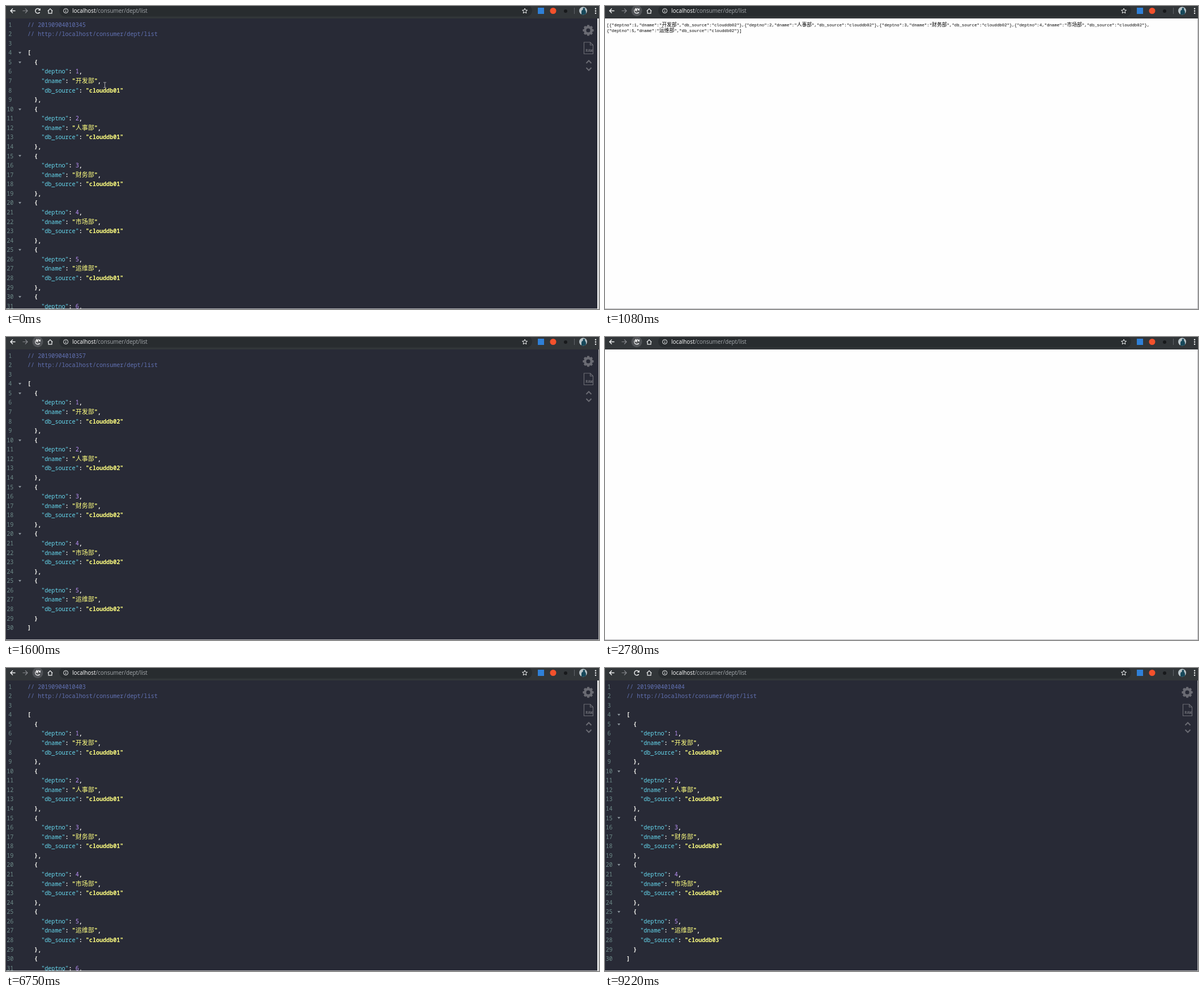
These frames come from a looping animation (1047x535 px, 9600 ms). An HTML page with a canvas:

```html
<!DOCTYPE html>
<html lang="zh">
<head>
<meta charset="utf-8">
<style>
html, body { margin: 0; width: 100%; height: 100%; overflow: hidden; background: #282a36; }
canvas { display: block; }
</style>
</head>
<body>
<canvas id="stage" width="1047" height="535"></canvas>
<script>
const ctx = document.getElementById('stage').getContext('2d');
const LOOP = 9600;
const MONO = '"Noto Sans Mono", monospace';
const CJK = '"Noto Sans CJK SC", "Noto Sans CJK", sans-serif';
const STYLES = {
  key: { color: '#66d9ef', weight: 500 },
  string: { color: '#ffff80', weight: 600 },
  number: { color: '#bd93f9', weight: 500 },
  mark: { color: '#f8f8f2', weight: 600 }
};
const DEPTS = ['开发部', '人事部', '财务部', '市场部', '运维部', '客服部'];

// Page states: start time, kind, database, last digits of the time stamp, fold marks
const PAGES = [
  { at: 0, db: 1, stamp: '0345', folds: true },
  { at: 1080, db: 2, raw: true },
  { at: 1200, db: 2, stamp: '0357' },
  { at: 1600, db: 2, stamp: '0357', folds: true },
  { at: 2780, blank: true },
  { at: 2900, db: 3, stamp: '0359' },
  { at: 3200, db: 3, stamp: '0359', folds: true },
  { at: 6750, db: 1, stamp: '0403' },
  { at: 7140, db: 1, stamp: '0403', folds: true },
  { at: 7660, db: 2, stamp: '0404' },
  { at: 8050, db: 2, stamp: '0404', folds: true },
  { at: 8290, db: 3, stamp: '0404' },
  { at: 8710, db: 3, stamp: '0404', folds: true }
];

const POINTER = [
  { at: 0, x: 174, y: 139 }, { at: 140, x: 122, y: 66 }, { at: 260, x: 72, y: 8 },
  { at: 380, x: 52, y: 4 }, { at: 530, x: 76, y: 3 }, { at: 660, x: 53, y: 3 },
  { at: 8710, x: 420, y: 190 }, { at: 8830, x: 860, y: 400 }, { at: 8950, x: 942, y: 458 },
  { at: 9070, x: 847, y: 439 }, { at: 9220, hidden: true }
];

const current = (steps, t) => steps.filter(s => s.at <= t).pop();

function rect(x, y, w, h, color) {
  ctx.fillStyle = color;
  ctx.fillRect(x, y, w, h);
}

function disc(x, y, r, color) {
  ctx.fillStyle = color;
  ctx.beginPath();
  ctx.arc(x, y, r, 0, 7);
  ctx.fill();
}

function stroke(d, color, width = 1.4) {
  ctx.strokeStyle = color;
  ctx.lineWidth = width;
  ctx.stroke(new Path2D(d));
}

function fill(d, color) {
  ctx.fillStyle = color;
  ctx.fill(new Path2D(d), 'evenodd');
}

function label(text, x, y, font, color, align = 'left') {
  ctx.font = font;
  ctx.fillStyle = color;
  ctx.textAlign = align;
  ctx.fillText(text, x, y);
}

// Mixed Latin and Chinese run; returns the x where it ends
function run(text, x, y, latin, cjkSize, color) {
  for (const part of text.match(/[一-龥]+|[^一-龥]+/g)) {
    label(part, x, y, /[一-龥]/.test(part) ? `300 ${cjkSize}px ${CJK}` : latin, color);
    x += ctx.measureText(part).width;
  }
  return x;
}

function jsonLines({ db, stamp }) {
  const count = db === 1 ? 6 : 5;
  const lines = [`// 2019090401${stamp}`, '// http://localhost/consumer/dept/list', '', '['];
  DEPTS.slice(0, count).forEach((name, i) => lines.push(
    '  {', `    "deptno": ${i + 1},`, `    "dname": "${name}",`,
    `    "db_source": "clouddb0${db}"`, i < count - 1 ? '  },' : '  }'));
  return lines.concat(']');
}

function tokenKind(token, rest) {
  if (token[0] === '"') return rest[0] === ':' ? 'key' : 'string';
  return /\d/.test(token) ? 'number' : 'mark';
}

function drawCode(page) {
  const font = `10.08px ${MONO}`;
  jsonLines(page).forEach((line, i) => {
    const middle = 33 + 16.57 * i, y = Math.round(middle + 3.6);
    if (middle > 535) return;
    label(i + 1, 7.3, y, font, '#6d8a88', 'center');
    if (page.folds && /[[{]$/.test(line)) {
      const top = Math.round(middle - 1.5);
      fill(`M22 ${top}h5l-2.5 3.5z`, '#8b949b');
    }
    if (line.startsWith('//')) return label(line, 38, y, font, '#6272b4');
    let x = 38, pos = 0;
    for (const token of line.match(/"[^"]*"|\d+|[^"\d]+/g) || []) {
      pos += token.length;
      const { color, weight } = STYLES[tokenKind(token, line.slice(pos))];
      x = run(token, x, y, `${weight} ${font}`, 11, color);
    }
  });
}

function drawSideTools() {
  const gray = '#6a6b73';
  ctx.save();
  ctx.translate(1028, 43);
  for (let i = 0; i < 8; i++) {
    ctx.rotate(Math.PI / 4);
    fill('M-2.6 -6L-1.8 -9.6H1.8L2.6 -6z', gray);
  }
  ctx.restore();
  ctx.lineWidth = 4.2;
  ctx.strokeStyle = gray;
  ctx.beginPath();
  ctx.arc(1028, 43, 5.7, 0, 7);
  ctx.stroke();
  stroke('M1020.5 64h11l5 5v15.5h-16zM1031.5 64v5h5', gray, 1.2);
  label('RAW', 1029.5, 80.5, `bold 7px ${MONO}`, gray, 'center');
  stroke('M1024.5 101l4.5-4.5l4.5 4.5M1024.5 109l4.5 4.5l4.5-4.5', gray, 2);
}

function drawRaw(db) {
  const items = DEPTS.slice(0, 5).map((name, i) =>
    `{"deptno":${i + 1},"dname":"${name}","db_source":"clouddb0${db}"}`);
  const font = '7.36px "Liberation Mono", monospace';
  run(`[${items.slice(0, 4).join(',')},`, 3, 36, font, 8.83, '#000');
  run(`${items[4]}]`, 3, 46, font, 8.83, '#000');
}

function drawToolbar(hover) {
  const white = '#f1f3f4';
  rect(0, 0, 1047, 22, '#323639');
  ctx.fillStyle = '#282c2f';
  ctx.beginPath();
  ctx.roundRect(94, -2, 835, 20.5, 10);
  ctx.fill();
  if (hover) disc(56, 8.5, 9.5, '#505357');
  stroke('M16.5 8.5H8M12 4.5l-4 4l4 4', white);
  stroke('M29.5 8.5H38M34 4.5l4 4l-4 4', '#85888c', 1.2);
  stroke('M59.6 11A4.2 4.2 0 1 1 59.2 5.8', white);
  fill('M60.8 3.8v4.2h-4.2z', white);
  stroke('M73.8 9l4.2-4.2l4.2 4.2M75 8.5v4.3h6v-4.3', white, 1.2);
  stroke('M101.6 8.5a4 4 0 1 0 8 0a4 4 0 1 0-8 0M105.6 8v2.8M105.6 6v1', white, 1);
  const font = '9.9px "Open Sans", "Noto Sans", sans-serif';
  label('localhost', 117, 12, font, '#fff');
  label('/consumer/dept/list', 117 + ctx.measureText('localhost').width, 12, font, '#a5a9ad');
  stroke('M916 4.2l1.3 2.9l3.2.3l-2.4 2.1l.7 3.2l-2.8-1.7l-2.8 1.7l.7-3.2l-2.4-2.1l3.2-.3z', white, 1);
  rect(939, 3, 11, 11, '#2f80d8');
  disc(966, 8.5, 5.5, '#f4512c');
  disc(988, 9, 3, '#17191b');
  rect(1003, 3, 1, 11, '#5f6368');
  disc(1019, 8.5, 7, '#b9c4c9');
  fill('M1016 15v-5q0-3 3-3.5a2 2 0 1 1 3 0q2 1 2 4v3q-3 3-8 1.5z', '#17485a');
  for (const y of [5, 9, 13]) disc(1041, y - .3, 1.2, white);
}

function drawPointer({ x, y, hidden }) {
  if (hidden) return;
  if (y > 22) {
    stroke(`M${x - 2} ${y - 4}h5M${x - 2} ${y + 5}h5M${x + .5} ${y - 4}v9`, '#a4a4aa', 1);
    return;
  }
  const arrow = `M${x} ${y - 1}v8.2l1.9-1.7l1.3 2.9l1.3-.6l-1.3-2.7h2.5z`;
  fill(arrow, '#fff');
  stroke(arrow, '#111', .6);
}

function drawTooltip() {
  rect(52, 13, 57, 13, '#767676');
  rect(52.6, 13.6, 55.8, 11.8, '#fff');
  label('重新加载此页', 80.5, 22.6, `8px ${CJK}`, '#575757', 'center');
}

function draw(t) {
  const page = current(PAGES, t);
  const light = page.raw || page.blank;
  rect(0, 0, 1047, 535, light ? '#fefefe' : '#282a36');
  if (page.raw) drawRaw(page.db);
  if (!light) {
    drawCode(page);
    drawSideTools();
  }
  drawToolbar(t >= 660 && t < 8710);
  rect(1046, 22, 1, 513, '#b9b9bc');
  rect(0, 534, 1047, 1, '#b9b9bc');
  if (page.db === 1) rect(1044, 22, 2, 513, '#f1f1f1');
  if (t >= 930 && t < 1080) drawTooltip();
  drawPointer(current(POINTER, t));
}

function tick() {
  draw(performance.now() % LOOP);
  requestAnimationFrame(tick);
}
tick();
</script>
</body>
</html>
```
